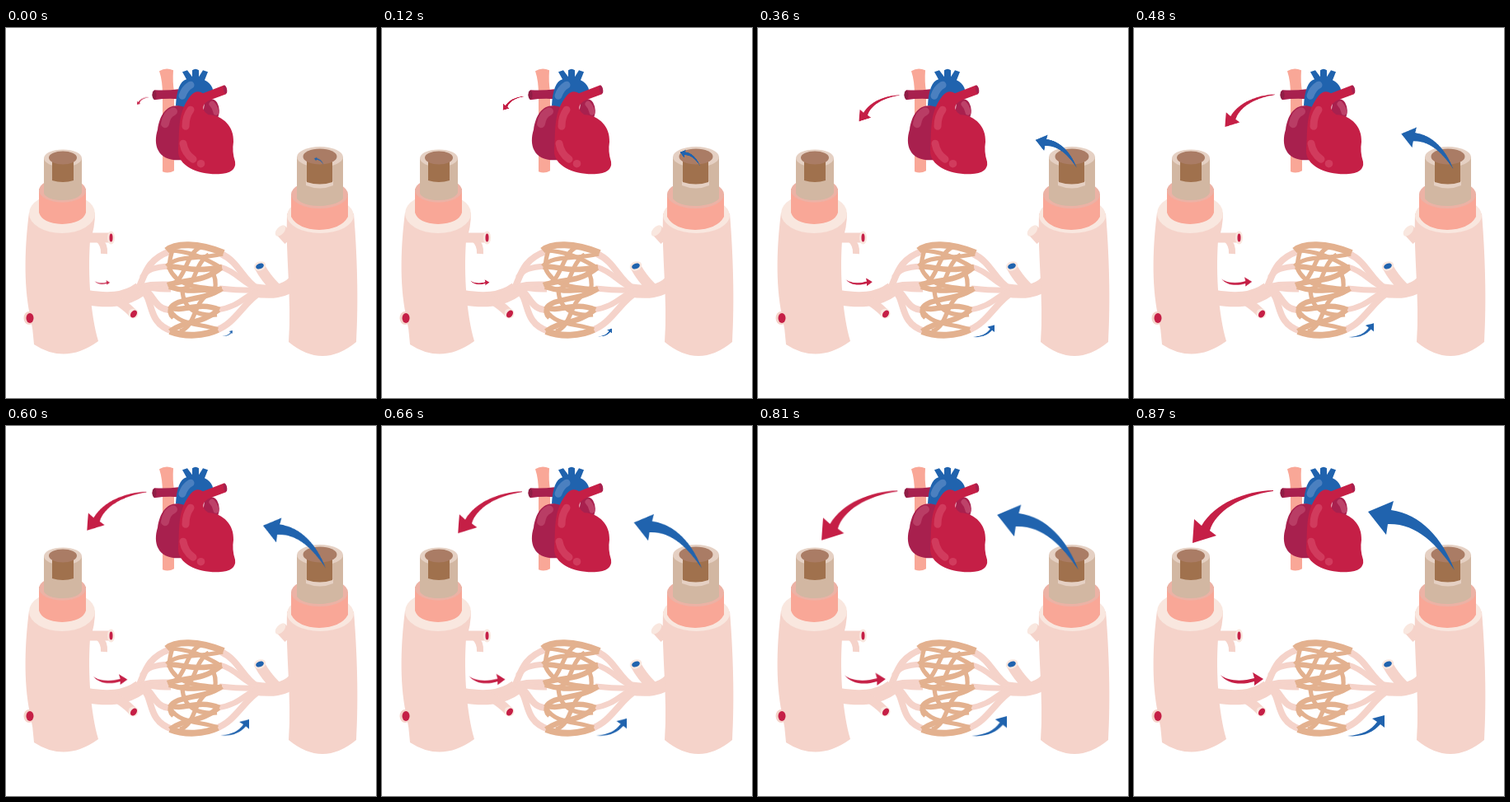
An HTML page that plays this animation: 449 by 449 pixels, repeating every 0.9 s.

```html
<!DOCTYPE html>
<html lang="en">
<head>
<meta charset="utf-8">
<title>Blood circulation</title>
<style>
  html, body { margin: 0; width: 100%; height: 100%; overflow: hidden; background: #fff; }
  svg { display: block; width: 100vw; height: 100vh; }
  .pink { fill: #f5d3ca; }
  .cream { fill: #f9e7df; }
  .salmon { fill: #f9a797; }
  .rim { fill: #ecb2a5; }
  .tan { fill: #d2b7a2; }
  .lip { fill: #e5d0c3; }
  .hole { fill: #aa7c65; }
  .brown { fill: #a0714d; }
  .red { fill: #c51f46; }
  .wine { fill: #a8204e; }
  .blue { fill: #2063ae; }
  .tube { fill: none; stroke: #f5d3ca; stroke-width: 6.8; }
  .mesh { fill: none; stroke: #e3b18f; stroke-width: 5.2; }
  .shine { fill: none; stroke-linecap: round; }
</style>
</head>
<body>
<svg viewBox="0 0 449 449">
  <!-- branches and capillaries -->
  <g class="tube">
    <path d="M98 327C122 331 144 331 163 317" stroke-width="18"/>
    <path d="M128 327C140 333 146 338 154 346" stroke-width="11"/>
    <path d="M158 321C168 306 167 282 199 271" stroke-width="8"/>
    <path d="M165 303C171 293 180 290 199 289"/>
    <path d="M159 316C173 310 182 311 200 311"/>
    <path d="M160 315C176 314 181 318 200 317"/>
    <path d="M163 315C180 320 178 343 202 342" stroke-width="8"/>
    <path d="M165 318C180 329 170 358 202 368" stroke-width="8"/>
    <path d="M349 309C338 320 323 322 299 318" stroke-width="16"/>
    <path d="M308 290Q315 303 327 315" stroke-width="13"/>
    <path d="M306 317C287 306 283 284 261 274" stroke-width="8"/>
    <path d="M306 317C287 310 279 295 260 290"/>
    <path d="M310 318Q286 319 259 316"/>
    <path d="M308 318C289 325 284 338 257 342"/>
    <path d="M311 319C288 332 279 359 254 367" stroke-width="8"/>
    <path d="M100 254.500H126" stroke-width="12"/>
    <path d="M112 256Q120 263 119 274" stroke-width="8"/>
    <path d="M344 257L333 245" stroke-width="15"/>
  </g>
  <g class="mesh">
    <path d="M195 270C205 261 233 260 264 273" stroke-width="8"/>
    <path d="M199 270C220 271 236 276 261 291"/>
    <path d="M195 289C209 275 229 282 263 274"/>
    <path d="M196 289C218 290 226 297 262 290" stroke-width="6.500"/>
    <path d="M197 312C219 309 217 274 236 266"/>
    <path d="M198 291C207 314 233 315 261 317"/>
    <path d="M196 312C218 304 238 310 261 291" stroke-width="6.500"/>
    <path d="M211 317C231 318 226 288 246 275"/>
    <path d="M198 314C221 322 237 317 262 317" stroke-width="6.500"/>
    <path d="M199 341C207 326 239 332 262 316" stroke-width="6.500"/>
    <path d="M200 339C214 346 233 331 259 342" stroke-width="6.500"/>
    <path d="M214 318C215 342 233 350 256 348"/>
    <path d="M199 342C210 362 237 358 257 366"/>
    <path d="M199 368C218 354 237 360 258 342" stroke-width="6.500"/>
    <path d="M211 368C231 362 226 334 247 322"/>
    <path d="M199 368C217 375 241 374 257 366" stroke-width="8"/>
    <path d="M248 291Q257 305 253 319M203 267Q198 280 198 293M201 338Q196 345 203 352"/>
  </g>

  <!-- branch openings -->
  <g class="cream">
    <ellipse cx="127.500" cy="254.500" rx="4.500" ry="8"/>
    <ellipse cx="154.500" cy="346.500" rx="6" ry="6"/>
    <ellipse cx="308" cy="289" rx="7.500" ry="5.500" transform="rotate(-20 308 289)"/>
    <ellipse cx="333" cy="246" rx="4.500" ry="8" transform="rotate(42 333 246)"/>
  </g>
  <ellipse class="red" cx="127.500" cy="254.500" rx="2" ry="5"/>
  <ellipse class="red" cx="155" cy="347" rx="3.500" ry="5" transform="rotate(35 155 347)"/>
  <ellipse class="blue" cx="308" cy="289" rx="5" ry="3.300" transform="rotate(-20 308 289)"/>

  <!-- left vessel -->
  <path class="pink" d="M28 224C23 262 21 310 29 348Q33 366 34 384Q72 409 112 380C103 348 99 302 102 258Q108 243 108 224Z"/>
  <ellipse class="cream" cx="68" cy="225" rx="40" ry="24"/>
  <path class="salmon" d="M40 195V224Q44 237 68 238Q93 237 97 224V195Z"/>
  <ellipse class="rim" cx="68.500" cy="197" rx="28.500" ry="14.500"/>
  <path class="tan" d="M46 158V201Q51 209 69 209Q87 209 92 200V158Z"/>
  <ellipse class="lip" cx="69" cy="158" rx="23" ry="10.500"/>
  <path class="brown" d="M56 161V185Q69 189 82 185V161Z"/>
  <ellipse class="hole" cx="69" cy="157.500" rx="17" ry="8"/>
  <ellipse class="pink" cx="28" cy="352" rx="6.500" ry="8"/>
  <ellipse class="red" cx="29" cy="352" rx="4.500" ry="6"/>

  <!-- right vessel -->
  <path class="pink" d="M341 225C339 276 347 330 343 381Q384 415 425 381C428 332 426 272 422 225Z"/>
  <ellipse class="cream" cx="381.500" cy="227.500" rx="40.500" ry="21.500"/>
  <path class="salmon" d="M346 201V229Q354 244 380 245Q407 244 415 229V201Z"/>
  <ellipse class="rim" cx="380.500" cy="202" rx="34.500" ry="17"/>
  <path class="tan" d="M353 156V207Q360 216 381 216Q402 215 409 207V156Z"/>
  <ellipse class="lip" cx="381" cy="156.500" rx="28" ry="12.500"/>
  <path class="lip" d="M364 186V191Q381 198 397 191V186Z"/>
  <path class="brown" d="M365 160V187Q381 192 396 187V160Z"/>
  <ellipse class="hole" cx="381" cy="156" rx="20.500" ry="9.500"/>

  <!-- heart -->
  <g transform="translate(0 -0.800)">
    <path class="salmon" d="M186 53Q194 48 203 52Q202 66 204 78V174Q197 178 190 175V82Q190 65 186 53Z"/>
    <path class="wine" d="M180 76Q196 77 209 75V87Q195 86 180 88Q175 82 180 76Z"/>
    <ellipse cx="180" cy="82" rx="2.500" ry="5.500" fill="#8f1d45"/>
    <path class="blue" d="M206 95C207 77 211 65 219 63L214 54L220 52L226 60L226 52Q230 49 234 52L234 60L239 52L245 54L241 64C250 68 254 77 250 87L228 101Z"/>
    <path class="shine" d="M214 83Q217 74 224 70" stroke="#4b80c0" stroke-width="9"/>
    <path class="wine" d="M241 91Q250 83 256 91Q261 100 257 110L239 106Z"/>
    <path class="shine" d="M250 93Q254 97 255 103" stroke="#bd4269" stroke-width="7"/>
    <path class="wine" d="M217 97C198 90 187 103 184 124C178 143 184 163 213 161L226 130Z"/>
    <path class="shine" d="M193 117Q195 105 203 102" stroke="#b93d65" stroke-width="10"/>
    <path class="red" d="M224 83Q231 75 239 80L265 70Q270 75 267 81L248 88C236 93 238 102 246 106C264 107 277 121 276 139Q274 151 278 163Q280 177 258 178C235 179 208 169 209 149C211 128 207 104 224 83Z"/>
    <ellipse class="wine" cx="266" cy="75.500" rx="2" ry="5" transform="rotate(-12 266 75.500)"/>
    <path class="shine" d="M218 120Q218 108 224 100" stroke="#d13b5d" stroke-width="9"/>
    <path class="shine" d="M215 141Q217 153 227 160" stroke="#d13b5d" stroke-width="9"/>
    <circle cx="236.500" cy="165.500" r="4.800" fill="#d13b5d"/>
  </g>

  <!-- flow arrows -->
  <g id="arrows">
    <path class="red" d="M169 78C134 79 98 94 82 121L73 113L71 142L100 133L92 127C99 104 128 85 169 79Z"/>
    <path class="blue" d="M389 175C374 136 348 107 312 102L315 91L284 104L306 132L308 119C343 118 367 143 389 175Z"/>
    <path class="red" d="M105 302C114 310 132 310 146 306L144 299L157 307L146 315L146 310C130 315 113 313 105 302Z"/>
    <path class="blue" d="M259 376C277 375 288 369 295 359L289 355L304 351L304 366L299 362C290 372 276 378 259 376Z"/>
  </g>
</svg>
<script>
  // anchor x, anchor y, starting scale
  const growth = [
    [173.9, 84.7, 0.145],
    [385, 165, 0.11],
    [109.3, 310, 0.35],
    [263.7, 373.2, 0.28]
  ];
  document.querySelectorAll('#arrows path').forEach((arrow, i) => {
    const [x, y, scale] = growth[i];
    arrow.style.transformOrigin = `${x}px ${y}px`;
    arrow.animate(
      { transform: [`scale(${scale})`, 'scale(1)'] },
      { duration: 900, iterations: Infinity, easing: 'steps(30, jump-none)' }
    );
  });
</script>
</body>
</html>
```
